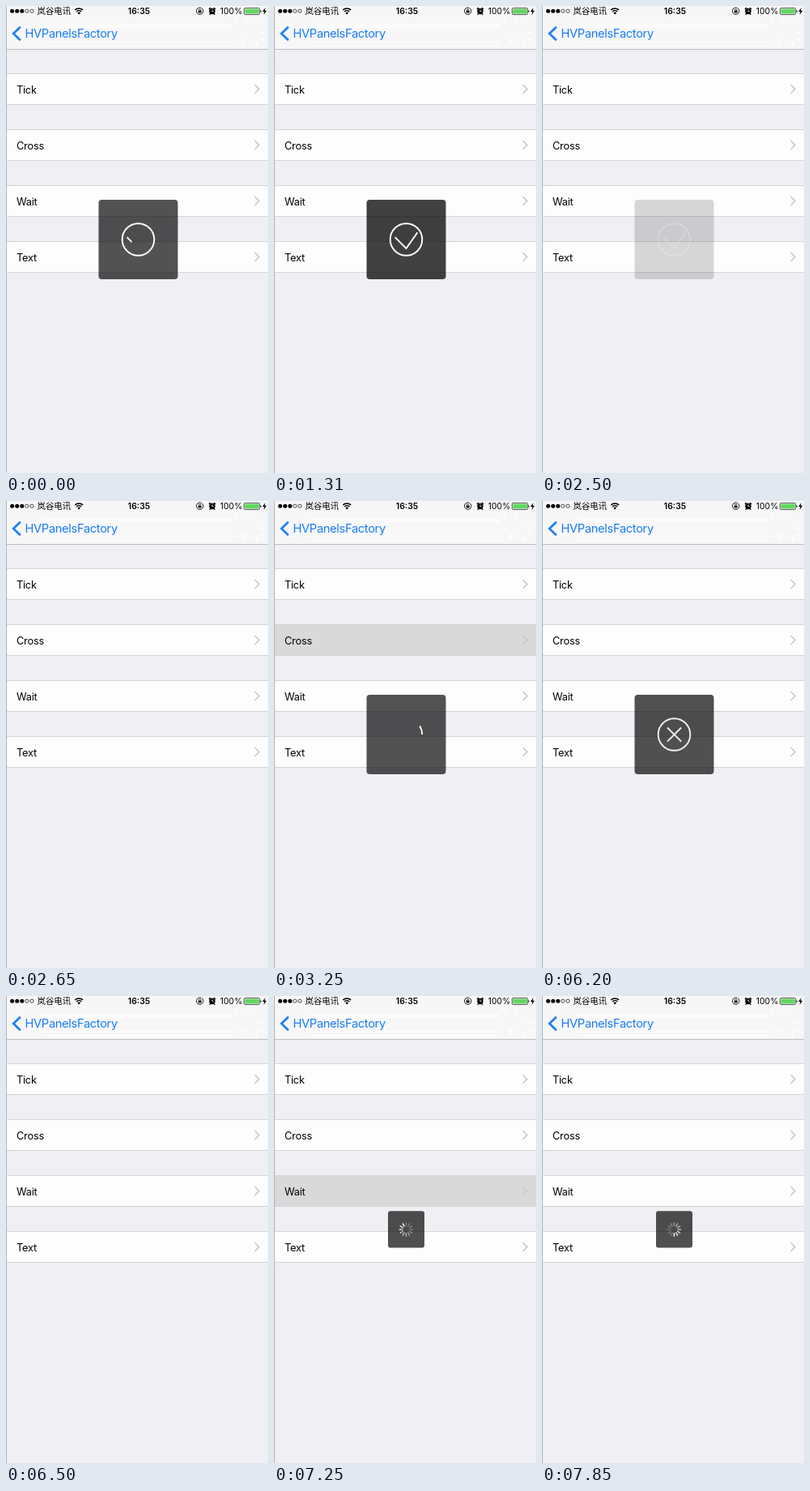
Animation, 324 px wide and 576 px high, one loop 7990 ms. Source, as an HTML page:

```html
<!DOCTYPE html>
<html lang="en">
<head>
<meta charset="utf-8">
<title>Alert panels</title>
<style>
  html, body { margin: 0; width: 100%; height: 100%; overflow: hidden; background: #efeff4; }
  svg { display: block; width: 100vw; height: 100vh; }
  text { font-family: Inter, Roboto, sans-serif; fill: #000; }
  .status { font-size: 10.4px; }
  .carrier { font-family: "Noto Sans CJK SC", "Noto Sans CJK", sans-serif; }
  .clock { font-weight: 600; text-anchor: middle; }
  .title { font-size: 14.7px; letter-spacing: -.35px; fill: #1a7df8; }
  .label { font-size: 12.8px; letter-spacing: -.25px; }
  .line { fill: none; stroke: #000; }
  .mark { fill: none; stroke: #fff; stroke-width: 1.9; }
</style>
</head>
<body>
<svg viewBox="0 0 324 576" preserveAspectRatio="none">
  <rect width="324" height="576" fill="#efeff4"/>
  <g id="rows"></g>

  <g id="nav">
    <rect width="324" height="53" fill="#f7f7f8"/>
    <g fill="#fff" opacity=".65">
      <rect x="44" y="22" width="235" height="5"/>
      <rect x="44" y="43" width="237" height="1.5"/>
      <rect x="44" y="48" width="237" height="1.5"/>
      <path d="M284 14h3v6h-3zM291 40h4v8h-4zM297 18h3v4h-3zM309 44h3v6h-3zM312 32h8v2h-8zM314 40h5v3h-5z"/>
    </g>
    <rect y="53" width="324" height="1" fill="#bdbdc0"/>
    <path d="M17.8 25.8L9.2 34l8.6 8.2" fill="none" stroke="#1a7df8" stroke-width="2.6"/>
    <text class="title" x="23.5" y="39">HVPanelsFactory</text>
  </g>

  <g id="status">
    <g id="signal"></g>
    <text class="status carrier" x="38.5" y="10">岚谷电讯</text>
    <g class="line" stroke-width="1.5">
      <path d="M85.3 4.9a7 7 0 0 1 9.8 0M87.2 7a4.3 4.3 0 0 1 6 0"/>
    </g>
    <path d="M88.4 8.4a2.6 2.6 0 0 1 3.6 0l-1.8 2z"/>
    <text class="status clock" x="164.5" y="10">16:35</text>
    <g class="line">
      <path d="M237.2 2.8a4.2 4.2 0 1 0 5 0" stroke-width=".9"/>
      <path d="M237.2 2.8a4.2 4.2 0 0 1 4.4-.4" stroke-width=".9"/>
      <path d="M238.5 5.8v-.8a1.2 1.2 0 0 1 2.4 0v.8" stroke-width=".7"/>
    </g>
    <rect x="237.8" y="5.6" width="3.8" height="2.8"/>
    <circle cx="255" cy="6.5" r="3.7"/>
    <path class="line" d="M251 4l2-2M259 4l-2-2M252.8 9.4l-1 1.4M257.2 9.4l1 1.4" stroke-width="1.3"/>
    <path d="M255 4.3v2.4h1.9" fill="none" stroke="#fff" stroke-width=".8"/>
    <text class="status" x="264.8" y="10">100%</text>
    <rect x="294.4" y="2.4" width="19.4" height="8.2" rx="1.6" fill="none" stroke="#333" stroke-width=".8"/>
    <rect x="295.4" y="3.4" width="17.4" height="6.2" rx=".8" fill="#62d860"/>
    <path d="M314.5 5a1.6 1.6 0 0 1 0 3z"/>
    <path d="M320.6 2l-3.4 5h2.2l-.8 4 3.6-5.2h-2.3z"/>
  </g>

  <rect width="1" height="576" fill="#b4b4b8"/>

  <g id="alert">
    <rect id="panel" x="114.5" y="239" width="98" height="98" rx="4"/>
    <g id="marks" class="mark">
      <path id="ring" pathLength="1" d="M183.3 288a19.8 19.8 0 1 0-39.6 0a19.8 19.8 0 1 0 39.6 0"/>
      <path id="tick" pathLength="1" d="M149.6 285.2L163.4 299L177.4 279.4"/>
      <path id="slash" pathLength="1" d="M155 279.5l17.2 17.2"/>
      <path id="back" pathLength="1" d="M172.2 279.5l-17.2 17.2"/>
    </g>
  </g>

  <g id="wait">
    <rect x="141" y="265.3" width="45" height="45.2" rx="3" fill-opacity=".685"/>
    <g id="spokes" stroke="#fff" stroke-width="1.5" stroke-linecap="round"></g>
  </g>
</svg>

<script>
const LOOP = 7990, STEPS = 54, STEP = LOOP / STEPS, LEAD = 22;
const TICK_AT = -4, CROSS_AT = 22, WAIT_AT = 49;   // in steps
const FADE = 180;
const $ = id => document.getElementById(id);
const clamp = v => Math.max(0, Math.min(1, v));

function add(parent, tag, attrs, text) {
  const el = document.createElementNS("http://www.w3.org/2000/svg", tag);
  for (const name in attrs) el.setAttribute(name, attrs[name]);
  if (text) el.textContent = text;
  return parent.appendChild(el);
}

const glows = ["Tick", "Cross", "Wait", "Text"].map((name, i) => {
  const y = 83 + 69 * i, rows = $("rows");
  add(rows, "rect", { y, width: 324, height: 39, fill: "#fdfdfd" });
  const glow = add(rows, "rect", { y, width: 324, height: 39, fill: "#d9d9d9", opacity: 0 });
  for (const edge of [y, y + 38])
    add(rows, "rect", { y: edge, width: 324, height: 1, fill: "#d5d5d8" });
  add(rows, "text", { x: 13, y: y + 24.5, class: "label" }, name);
  add(rows, "path", { d: `M307.8 ${y + 14.3}l5.2 5.2l-5.2 5.2`, fill: "none", stroke: "#c7c7cc", "stroke-width": 1.6 });
  return glow;
});

for (let i = 0; i < 5; i++)
  add($("signal"), "circle", {
    cx: 7.6 + 6.1 * i, cy: 6.2, r: i < 3 ? 2.5 : 2.1,
    fill: i < 3 ? "#000" : "none", stroke: i < 3 ? "none" : "#000", "stroke-width": .7
  });

const spokes = Array.from({ length: 12 }, (_, i) => add($("spokes"), "line", {
  x1: 163.4, x2: 163.4, y1: 283.2, y2: 279.8, transform: `rotate(${30 * i} 163.4 288)`
}));

function trace(id, part) {
  const p = clamp(part), el = $(id);
  el.style.display = p > 0 ? "" : "none";
  el.setAttribute("stroke-dasharray", p < 1 ? `${p} 2` : "none");
}

function drawAlert(step) {
  const isCross = step >= CROSS_AT;
  const u = step - (isCross ? CROSS_AT : TICK_AT);
  const shape = .19 + .27 * (u - 4);
  const show = 1 - clamp((step * STEP - (isCross ? 6198 : 2372)) / FADE);
  const tone = Math.min(.75, .675 + .0075 * Math.max(0, u - 4));
  $("panel").setAttribute("fill-opacity", tone * show);
  $("marks").setAttribute("stroke-opacity", show);
  trace("ring", .09 + .27 * u);
  trace("tick", isCross ? 0 : shape);
  trace("slash", isCross ? shape * 2 : 0);
  trace("back", isCross ? shape * 2 - 1 : 0);
}

function drawWait(step) {
  const on = step >= WAIT_AT;
  $("wait").style.display = on ? "" : "none";
  if (!on) return;
  const head = Math.round(18 + (step - 53) * STEP * 12 / 1000);
  spokes.forEach((el, i) => {
    const age = (head - i + 24) % 12;
    el.setAttribute("stroke-opacity", Math.max(.25, .95 - .085 * age));
  });
}

function drawGlow(row, step, start) {
  const u = step - start;
  glows[row].setAttribute("opacity", u < 0 ? 0 : clamp(1.1 - .3 * u));
}

let begin = null;
function frame(now) {
  if (begin === null) begin = now;
  const t = Math.max(0, now - begin) % LOOP;
  const step = Math.min(STEPS - 1, Math.floor((t + LEAD) / STEP));
  drawAlert(step);
  drawWait(step);
  drawGlow(1, step, CROSS_AT);
  drawGlow(2, step, WAIT_AT);
  requestAnimationFrame(frame);
}
frame(performance.now());
</script>
</body>
</html>
```
